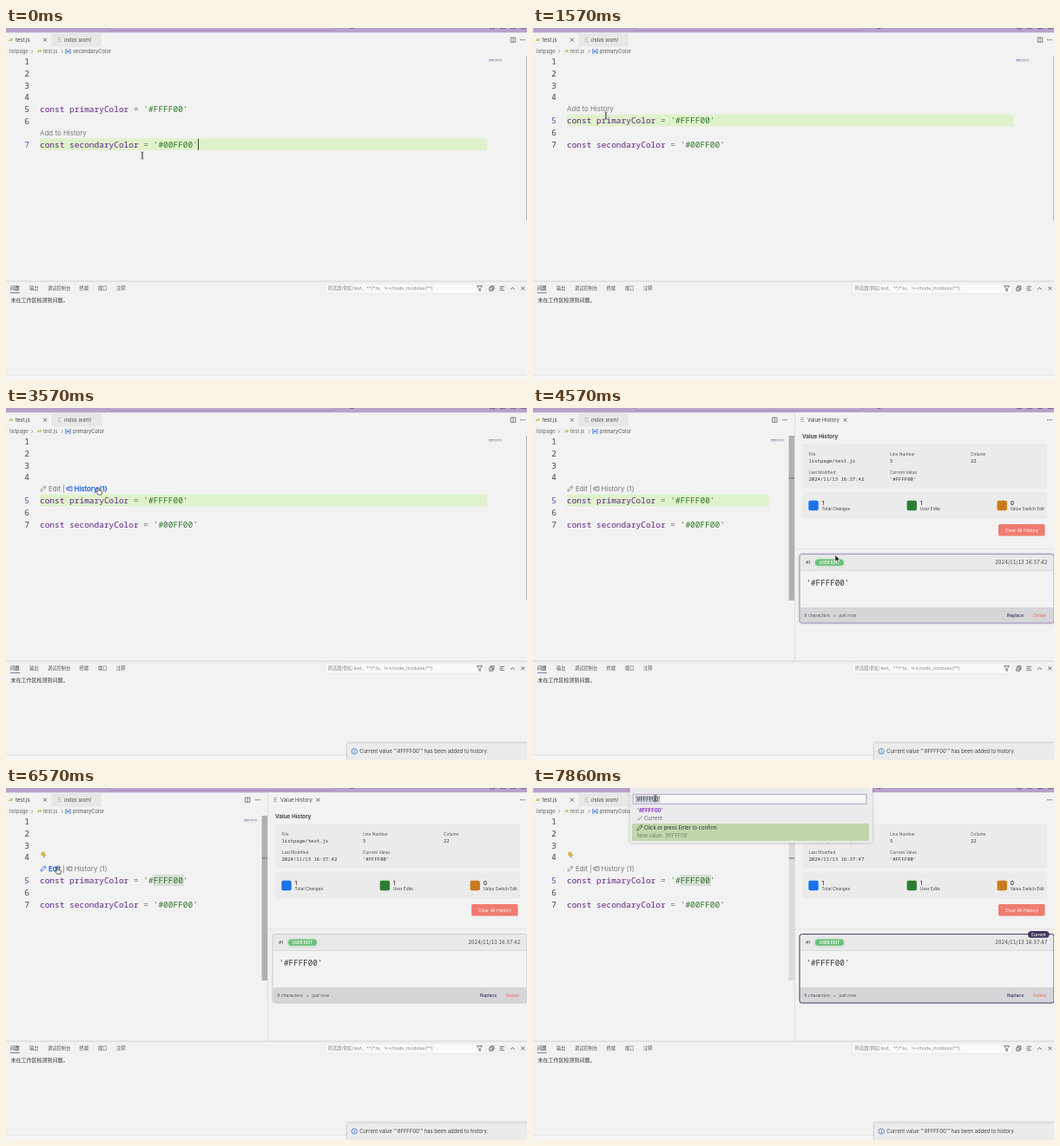
Write an HTML page that moves like this. It is 600x406 px and loops after 8 s.

```html
<!DOCTYPE html>
<html lang="zh">
<head>
<meta charset="utf-8">
<title>Value history in a code editor</title>
<style>
html, body { margin: 0; width: 100%; height: 100%; overflow: hidden; background: #f2f2f2; }
svg { display: block; width: 600px; height: 406px; }
text { white-space: pre; font-family: Inter, "Noto Sans CJK SC", "Noto Sans CJK", sans-serif; }
.mono { font-family: "Noto Sans Mono", "DejaVu Sans Mono", monospace; }
#stamp { font-variant-numeric: tabular-nums; }
</style>
</head>
<body>
<svg id="stage" viewBox="0 0 600 406" xmlns="http://www.w3.org/2000/svg"></svg>
<script>
const LOOP = 8000, CHAR = 5.69, CODE = 9.48;
const INK = '#3b3b3b', GREY = '#777', PURPLE = '#5f2487', LINK = '#0b57e3';

// Markup helpers: text is placed by its vertical centre.
const text = (x, cy, size, str, fill = INK, extra = '') =>
  `<text x="${x}" y="${(cy + size * 0.355).toFixed(2)}" font-size="${size}" fill="${fill}" ${extra}>${str}</text>`;
const mono = (x, cy, size, str, fill, extra = '') => text(x, cy, size, str, fill, 'class="mono" ' + extra);
const rect = (x, y, w, h, fill, extra = '') =>
  `<rect x="${x}" y="${y}" width="${w}" height="${h}" fill="${fill}" ${extra}/>`;
const line = (d, stroke = '#555', w = 0.7, extra = '') =>
  `<path d="${d}" fill="none" stroke="${stroke}" stroke-width="${w}" ${extra}/>`;
const group = (id, body, extra = '') => `<g id="${id}" ${extra}>${body}</g>`;
const cross = (x, y) => line(`M${x - 2} ${y - 2}l4 4m0 -4l-4 4`, '#444', 0.8);
const dots = (x, y) => [-2.2, 0, 2.2].map(d => `<circle cx="${x + d}" cy="${y}" r=".65" fill="#555"/>`).join('');
const split = (x, y) => line(`M${x - 2.7} ${y - 2.7}h5.4v5.4h-5.4zm2.7 0v5.4`);
const chevron = x => line(`M${x} 25l2 2l-2 2`, '#777', 0.6);
const pencil = (x, y, stroke = 'currentColor') =>
  line(`M${x} ${y + 6}l.6 -2.2l4 -4l1.6 1.6l-4 4zm3.8 -5.2l1.5 1.5`, stroke, 0.7);
const jsMark = (x, y) => text(x, y, 4, 'JS', '#a5a500', 'font-weight="700"');

const codeLine = (id, name, value) => group(id,
  mono(39, 0, CODE, `<tspan fill="#571c85">const</tspan> <tspan fill="${PURPLE}">${name}</tspan> ` +
    `<tspan fill="#777">=</tspan> <tspan fill="#2f7528">'${value}'</tspan>`, INK));

function titleBar() {
  return rect(0, 0, 600, 5.5, '#b8a2cb') +
    rect(118, -8, 262, 10.6, '#bca9cf', 'rx="2.5" stroke="#9480ad" stroke-width=".6"') +
    line('M396 0q2.3 1.8 4.6 0', '#5a4a69', 0.7) +
    [560, 572, 584, 596].map(x => line(`M${x - 2.7} -2v2.7h5.4v-2.7`, '#5a4a69', 0.7)).join('');
}

function tabs() {
  return rect(0, 5.5, 600, 16, '#f3f3f3') + rect(52, 5.5, 58, 16, '#e7e7e7') +
    jsMark(3, 13.7) + text(11, 13.7, 5.9, 'test.js', '#333') + cross(45, 13.7) +
    line('M59.5 11.5h4m-4 2h3m-3 2h4', '#aaa', 0.6) +
    text(67, 13.7, 5.8, 'index.wxml', '#555', 'font-style="italic"') + dots(595, 13.7) +
    text(4, 27, 5.85, 'listpage', '#666') + chevron(29) + jsMark(36, 27) +
    text(43, 27, 5.85, 'test.js', '#666') + chevron(63.5) +
    line('M70.2 24.6h-1.4v4.8h1.4m2.6 -4.8h1.4v4.8h-1.4m-2.3 -3.2h2v1.6h-2z', '#1b5fc4', 0.7) +
    text(77, 27, 5.85, '', '#555', 'id="crumb"');
}

const minimap = x => [[6, 13, 15], [6, 14, 15.5]].map(([a, b, c], i) => {
  const y = 36 + i * 1.5;
  return rect(x, y, a, 0.8, '#a98fc0') + rect(x + a + 0.6, y, b - a - 2, 0.8, '#b6a3c8') +
    rect(x + b - 1, y, c - b + 1, 0.8, '#9fbf92');
}).join('');

function editor() {
  return rect(39, 0, 515, 13.6, '#dff2cb', 'id="current"') +
    rect(169.5, 100, 35.5, 13, '#d8ddd8', 'id="selection"') +
    [1, 2, 3, 4, 5, 6, 7].map(n => mono(27, 0, CODE, n, '#444', `id="num${n}" text-anchor="end"`)).join('') +
    codeLine('primary', 'primaryColor', '#FFFF00') + codeLine('secondary', 'secondaryColor', '#00FF00') +
    rect(0, 0, 0.9, 13, '#222', 'id="caret"') +
    group('addLens', text(39, 0, 7.95, 'Add to History', 'currentColor')) +
    group('editLens',
      group('editLink', pencil(40, 90) + text(49, 93, 7.9, 'Edit', 'currentColor')) +
      text(65, 93, 7.9, '|', GREY) +
      group('historyLink', line('M72 90.8h4v4.4h-4zm0 1h-2.2v2.4h2.2m1.3 -2.2h1.6', 'currentColor', 0.8) +
        text(78.5, 93, 7.95, 'History (1)', 'currentColor'))) +
    group('bulb', `<circle cx="42.6" cy="76" r="2" fill="#e4c33a" stroke="#a98a12" stroke-width=".6"/>` +
      line('M42.3 78.6l2.6 1.8m-.6 -3.4l1.8 1', '#9a7c10', 0.9)) +
    group('wideEdge', minimap(556) + split(584, 13.7) + rect(599, 32, 1, 190, '#b4b4b4'));
}

function bottomPanel() {
  const names = [[5, '问题'], [27, '输出'], [48, '调试控制台'], [84.5, '终端'], [106, '端口'], [127, '注释']];
  return rect(0, 292, 600, 114, '#f2f2f2') + rect(0, 291.6, 600, 0.9, '#d0d0d0') +
    names.map(([x, s], i) => text(x, 300.5, 5.25, s, i ? '#555' : '#222', 'font-weight="500"')).join('') +
    rect(5, 305.1, 11, 0.8, '#705697') +
    rect(367.5, 295, 184, 11, '#fafafa', 'stroke="#dedede" stroke-width=".5"') +
    text(370.5, 300.5, 5.3, '筛选器(例如 text、**/*.ts、!**/node_modules/**)', '#888') +
    line('M542.5 297.5h6l-2.3 3v3l-1.4 -.8v-2.2z', '#444') +
    line('M556.8 299.2h3.8v4h-3.8zm1.4 0v-1.6h3.8v4h-1.4m-2.6 -.4h1.6', '#444') +
    line('M568.5 298.3h5.5m-5.5 2h3.8m-3.8 2h5.5', '#444') +
    line('M581 301.7l2.4 -2.4l2.4 2.4', '#444', 0.8) + cross(595.3, 300.3) +
    text(5.5, 313.5, 6, '未在工作区检测到问题。', '#333') +
    rect(0, 400.6, 600, 5.4, '#f6f6f6') + rect(0, 400.3, 600, 0.6, '#dcdcdc');
}

function historyPage() {
  const field = (x, y, label, value, id = '') =>
    text(x, y, 4.8, label, '#555') + mono(x, y + 7.8, 5.6, value, '#333', id);
  const stat = (x, n, label, fill) =>
    rect(x, 106.8, 11.4, 11.4, fill, 'rx="2"') +
    line(`M${x + 3.7} 110.5h4v4h-4z`, '#0001', 0.8) +
    text(x + 15.2, 110, 6.6, n, '#333', 'font-weight="500"') + text(x + 15.2, 116.5, 4.8, label, '#444');
  return text(310, 33.2, 6.4, 'Value History', '#333', 'font-weight="600"') +
    rect(310, 41.5, 282, 51, '#ebebeb', 'rx="2"') +
    field(317.5, 53, 'File', 'listpage/test.js') + field(411, 53, 'Line Number', '5') +
    field(504, 53, 'Column', '22') + field(317.5, 74.2, 'Last Modified', '', 'id="modified"') +
    field(411, 74.2, 'Current Value', "'#FFFF00'") +
    rect(310, 97.5, 282, 30, '#ebebeb', 'rx="2"') +
    stat(317.3, 1, 'Total Changes', '#1b73ea') + stat(430.6, 1, 'User Edits', '#2f7f34') +
    stat(534.5, 0, 'Value Switch Edit', '#cc7c1d') +
    rect(536, 134, 53.5, 13.5, '#f07b71', 'rx="1.5"') +
    text(562.8, 140.8, 5, 'Clear All History', '#fff', 'text-anchor="middle"') +
    rect(302, 162.6, 298, 0.7, '#d8d8d8');
}

function card() {
  const shape = 'M309.5 168.6H597.5a2.5 2.5 0 0 1 2.5 2.5V245.5a2.5 2.5 0 0 1 -2.5 2.5H309.5' +
    'a2.5 2.5 0 0 1 -2.5 -2.5V171a2.5 2.5 0 0 1 2.5 -2.4z';
  return group('card',
    `<path id="glow" d="${shape}" fill="#7d63b0" opacity=".55" filter="url(#soft)"/>` +
    `<path d="${shape}" fill="#f3f3f3"/>` +
    rect(307.5, 169, 292, 18.5, '#e9e9e9', 'rx="2"') + rect(307.5, 187.2, 292.5, 0.6, '#cfcfcf') +
    rect(307.5, 230.5, 292, 17.2, '#d6d5d7', 'rx="2"') + rect(307.5, 230.3, 292.5, 0.6, '#c8c8c8') +
    `<path id="border" d="${shape}" fill="none"/>` +
    text(314, 178.3, 5.3, '#1', '#444') +
    rect(324.5, 174.4, 33.8, 8.2, '#6fbf7b', 'rx="4.1" filter="url(#soft)" opacity=".4"') +
    rect(325, 174.6, 32.8, 7.2, '#6cbf79', 'rx="3.6"') +
    text(341.4, 178.3, 4.6, 'USER EDIT', '#fff', 'text-anchor="middle" font-weight="600"') +
    text(592.5, 178.3, 5.7, '', '#444', 'id="stamp" text-anchor="end"') +
    mono(314.5, 202, 9.25, "'#FFFF00'", '#333') +
    text(312.3, 239.4, 5, '9 characters', '#555') + text(346, 239.4, 5, '•', '#666') +
    text(352.5, 239.4, 5, 'just now', '#555') +
    text(546, 239.4, 5, 'Replace', '#3a2560', 'font-weight="500"') + text(576, 239.4, 5, 'Delete', '#f0685c') +
    group('badge', rect(570, 165, 24.5, 7.8, '#43355f', 'rx="3.9"') +
      text(582.2, 168.9, 4.6, 'Current', '#fff', 'text-anchor="middle" font-weight="500"')));
}

function sidePane() {
  return group('pane',
    minimap(274) + split(278.3, 13.7) + dots(290, 13.7) +
    rect(294.6, 32, 6.4, 190, '#b0b0b0', 'id="scroll"') + rect(294.6, 80.4, 6.4, 1.1, '#777') +
    rect(301, 5.5, 299, 286, '#f2f2f2') + rect(301, 5.5, 0.8, 286, '#dadada') +
    rect(302, 5.5, 298, 16, '#f3f3f3') + line('M308 11.3h4m-4 2.2h4m-4 2.2h4', '#777', 0.6) +
    text(316, 13.7, 5.85, 'Value History', '#444') + cross(359.5, 13.7) + dots(595, 13.7) +
    group('page', historyPage() + card()));
}

function toast() {
  return group('toast',
    rect(393, 386.5, 212, 24, '#000', 'opacity=".3" filter="url(#soft)"') +
    rect(393, 386.5, 212, 24, '#ebebeb') +
    `<circle cx="401.2" cy="396" r="3.2" fill="none" stroke="#1a66cc" stroke-width=".7"/>` +
    line('M401.2 395.4v2.5m0 -4.1v.8', '#1a66cc', 0.8) +
    text(407.3, 396.2, 5.85, `Current value "'#FFFF00'" has been added to history.`, '#444'));
}

function picker() {
  return group('picker',
    rect(111.5, -4, 279.5, 67.5, '#000', 'rx="3" opacity=".28" filter="url(#soft)"') +
    rect(111.5, -4, 279.5, 67.5, '#ebebeb', 'rx="3"') +
    rect(115.2, 7.2, 268.8, 11, '#f7f7f7', 'stroke="#a68ac4" stroke-width=".8"') +
    rect(117.8, 8.6, 28.6, 8.2, '#c2c8d2') + text(118, 12.8, 5.8, "'#FFFF00'", '#333') +
    text(120, 25.8, 5.9, "'#FFFF00'", '#8a35c0', 'font-weight="700"') +
    line('M120.5 35l1.6 1.7l3.5 -4.2', '#666') + text(128, 34.8, 5.85, 'Current', '#666') +
    rect(114, 41, 273, 20, '#c1d6ac', 'rx="1.5"') + pencil(120, 42.8, '#444') +
    text(128, 46, 5.85, 'Click or press Enter to confirm', '#333') +
    text(120, 54.8, 5.7, "New value: '#FFFF00'", '#74806a'));
}

function pointers() {
  const bar = 'M-1.7 -4q1.7 0 1.7 1v6q0 1 -1.7 1m3.4 0q-1.7 0 -1.7 -1v-6q0 -1 1.7 -1';
  return group('beam', line(bar, '#fff', 1.4, 'opacity=".6"') + line(bar, '#333', 0.7)) +
    group('arrow', '<path d="M-2 -3.5v7.6l1.8 -1.6l1.2 2.7l1.2 -.5l-1.2 -2.6h2.4z" fill="#111" stroke="#fff" stroke-width=".6"/>') +
    group('hand', '<path d="M-1.4 -4q.8 -.7 1.5 0v3l2.8 .6q.9 .3 .8 1.2l-.7 3.2h-3.9l-2.4 -2.9q-.2 -1.1 .9 -.9l1 .8z" fill="#fff" stroke="#222" stroke-width=".7"/>');
}

const $ = id => document.getElementById(id);
$('stage').innerHTML =
  '<defs><filter id="soft" x="-10%" y="-50%" width="120%" height="200%"><feGaussianBlur stdDeviation="1.6"/></filter></defs>' +
  rect(0, 0, 600, 406, '#f2f2f2') + titleBar() + tabs() + editor() + sidePane() +
  bottomPanel() + toast() + picker() + pointers();

const show = (id, on) => { $(id).style.display = on ? '' : 'none'; };
const set = (id, attrs) => { for (const k in attrs) $(id).setAttribute(k, attrs[k]); };
const label = (id, s) => { if ($(id).textContent !== s) $(id).textContent = s; };
const shift = (id, x, y) => set(id, { transform: `translate(${x} ${y})` });
const ramp = (t, a, b) => Math.min(1, Math.max(0, (t - a) / (b - a)));
const inside = ([x, y], x0, y0, x1, y1) => x >= x0 && x <= x1 && y >= y0 && y <= y1;

// Pointer stops: time, x, y.
const PATH = [
  [0, 157, 147], [140, 157, 147], [800, 85, 97], [1250, 85, 102], [1570, 84, 101], [1710, 83, 96],
  [2500, 83, 96], [3000, 106, 95], [3570, 107, 96], [3960, 107, 96], [4570, 350, 173],
  [4980, 346, 176], [5600, 174, 110], [6200, 174, 110], [6600, 58, 95], [7400, 58, 95],
  [7830, 141, 12], [LOOP, 141, 12]
];

function pointerAt(t) {
  const i = Math.max(1, PATH.findIndex(p => p[0] > t));
  const [a, b] = [PATH[i - 1], PATH[i]];
  const k = ramp(t, a[0], b[0]), e = k * k * (3 - 2 * k);
  return [a[1] + (b[1] - a[1]) * e, a[2] + (b[2] - a[2]) * e];
}

const EVENTS = { line5: 950, added: 2270, pane: 3650, page: 3980, focus: 5450, select: 5900, bulb: 6330, pick: 6700, saved: 6800 };

function link(id, hot) {
  set(id, { color: hot ? LINK : GREY, stroke: hot ? LINK : 'none', 'stroke-width': 0.25 });
}

function draw(t) {
  const past = Object.fromEntries(Object.entries(EVENTS).map(([k, at]) => [k, t >= at]));
  const mouse = pointerAt(t);
  const top = past.line5 ? 106.5 : 94, active = past.line5 ? 5 : 7;
  const rowY = n => n < 5 ? 38.5 + (n - 1) * 13.85 : n === 5 ? top : n === 6 ? (past.line5 ? 120.3 : 107.8) : 134.2;

  for (let n = 1; n <= 7; n++) {
    shift('num' + n, 0, rowY(n));
    set('num' + n, { fill: n === active ? '#7247a8' : '#444' });
  }
  shift('primary', 0, rowY(5));
  shift('secondary', 0, rowY(7));
  label('crumb', past.line5 ? 'primaryColor' : 'secondaryColor');

  set('current', { y: rowY(active) - 6.8, width: past.pane ? 233 : 515 });
  show('current', !past.select);
  show('selection', past.select);
  show('bulb', past.bulb);

  const caretX = past.focus ? 39 + 30 * CHAR : past.line5 ? 39 + 8 * CHAR : 39 + 32 * CHAR;
  const since = past.focus ? t - EVENTS.focus : past.line5 ? t - EVENTS.line5 : t;
  shift('caret', caretX, rowY(active) - 6.5);
  show('caret', !past.select && (!past.pane || past.focus) && since % 1000 < 500);

  const onAdd = past.line5 && !past.added && inside(mouse, 39, 87, 93, 99.5);
  const onEdit = past.added && inside(mouse, 39, 87, 63.5, 99.5);
  const onHistory = past.added && inside(mouse, 68, 87, 117, 99.5);
  show('addLens', !past.added);
  show('editLens', past.added);
  shift('addLens', 0, past.line5 ? 93.5 : 121.5);
  link('addLens', onAdd);
  link('editLink', onEdit);
  link('historyLink', onHistory);

  show('wideEdge', !past.pane);
  show('pane', past.pane);
  show('page', past.page);
  // The scrollbar dims once the pointer leaves the editor.
  set('scroll', { opacity: 1 - 0.65 * ramp(t, 7450, 7850) });
  const stamp = '2024/11/13 16:37:' + (past.saved ? 47 : 42);
  label('modified', stamp);
  label('stamp', stamp);

  const overCard = inside(mouse, 307, 168, 600, 248);
  const start = past.saved ? EVENTS.saved : EVENTS.page;
  set('card', { opacity: ramp(t, start, start + 410) });
  set('border', {
    stroke: past.saved ? '#40365c' : overCard ? '#958ab5' : '#bcbcbc',
    'stroke-width': past.saved ? 1 : overCard ? 0.9 : 0.7
  });
  show('glow', overCard);
  show('badge', past.saved);

  show('toast', past.added);
  shift('toast', 0, 20 * (1 - ramp(t, EVENTS.added, EVENTS.added + 140)));
  show('picker', past.pick);

  const hand = onAdd || onEdit || onHistory;
  const arrow = !hand && past.pane && mouse[0] > 294;
  const shape = hand ? 'hand' : arrow ? 'arrow' : 'beam';
  for (const id of ['beam', 'arrow', 'hand']) show(id, id === shape);
  shift(shape, mouse[0], mouse[1]);
}

const begin = performance.now();
function tick() {
  draw((performance.now() - begin) % LOOP);
  requestAnimationFrame(tick);
}
tick();
</script>
</body>
</html>
```
